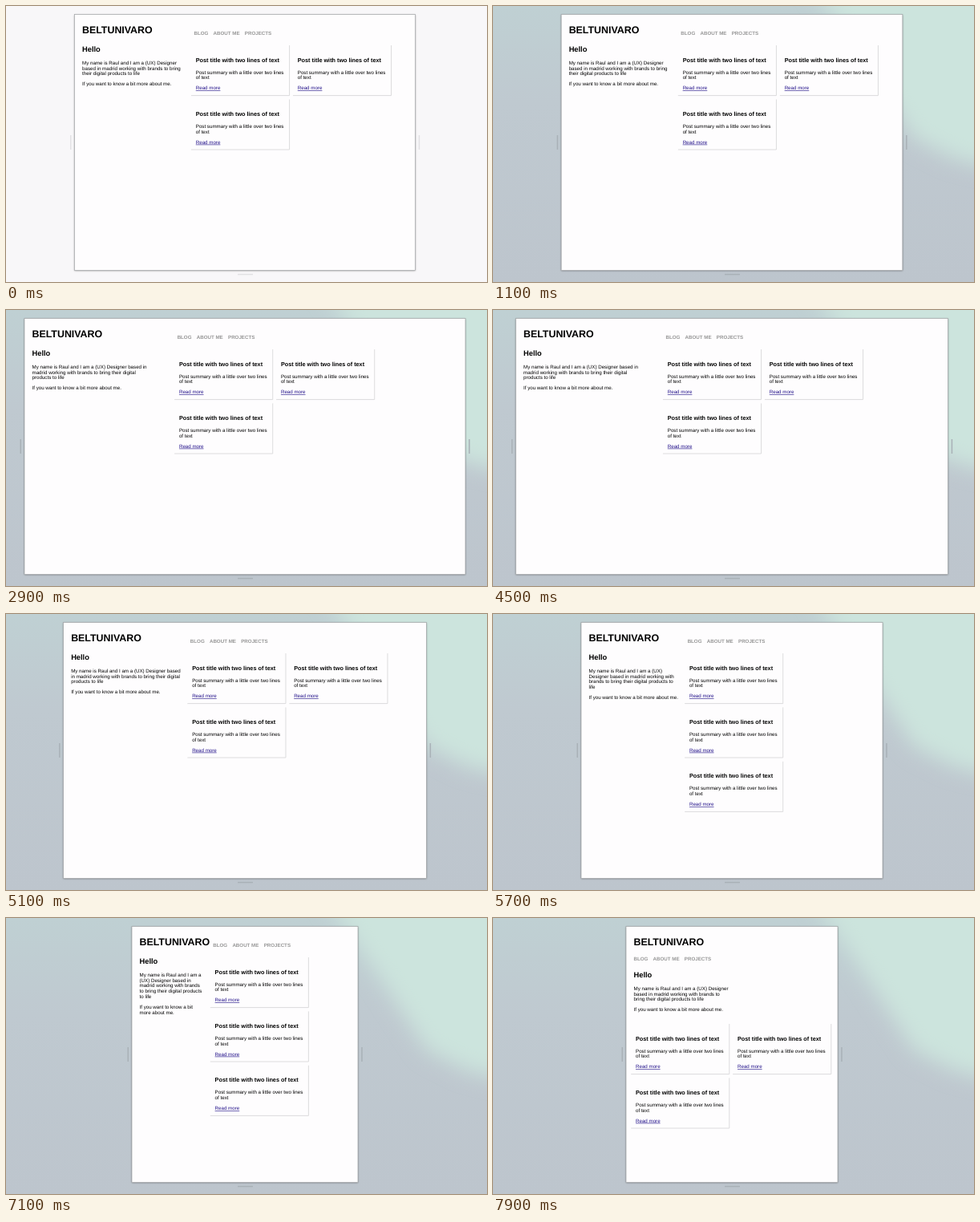
Animation of 600x344 px, one loop 8000 ms. Source, as an HTML page:

```html
<!DOCTYPE html>
<html lang="en">
<head>
<meta charset="utf-8">
<title>Responsive page</title>
<style>
  html, body { margin: 0; width: 100%; height: 100%; overflow: hidden; background: #f8f7f9; }
  svg { display: block; width: 600px; height: 344px; }
  text { font-family: "Liberation Sans", Arial, sans-serif; font-size: 6.2px; text-rendering: geometricPrecision; }
  .brand { font-size: 12.4px; font-weight: bold; }
  .nav { font-weight: bold; fill: #979797; }
  .heading { font-size: 9.3px; font-weight: bold; }
  .title { font-size: 7.27px; font-weight: bold; }
  .link { fill: #23128a; text-decoration: underline; }
  .edge { fill: none; stroke: #d9d8da; stroke-width: .9; }
</style>
</head>
<body>
<svg viewBox="0 0 600 344">
  <defs>
    <linearGradient id="sky" x2="0" y2="1">
      <stop offset="0" stop-color="#bfd0d3"/>
      <stop offset=".35" stop-color="#bfc9d0"/>
      <stop offset="1" stop-color="#bdc5cd"/>
    </linearGradient>
    <filter id="soft" x="-30%" y="-30%" width="160%" height="160%"><feGaussianBlur stdDeviation="13"/></filter>
    <filter id="shade" x="-5%" y="-5%" width="110%" height="110%"><feGaussianBlur stdDeviation="1.3"/></filter>
  </defs>
  <rect width="600" height="344" fill="#f8f7f9"/>
  <g id="backdrop">
    <rect width="600" height="344" fill="url(#sky)"/>
    <path d="M395-30L470 80L525 165L575 190L640 205V-30Z" fill="#cce4dd" filter="url(#soft)"/>
  </g>
  <rect id="shadow" y="11" height="319" fill="#000" opacity=".42" filter="url(#shade)"/>
  <rect id="page" y="10.5" height="319" fill="#fefdfe" stroke="#a3a5a8" stroke-width=".7"/>
  <g id="handles">
    <rect id="leftHandle" y="161" width="1.5" height="18"/>
    <rect id="rightHandle" y="161" width="1.5" height="18"/>
    <rect x="289" y="333.8" width="19" height="1.5"/>
  </g>
  <g id="content"></g>
</svg>
<script>
const LOOP = 8000, STEP = 100, CENTER = 298, LINE = 6.85;
const ACTIVE_AT = 1100;
const STACKED_BELOW = 272, TWO_COLUMNS_FROM = 392;

// Time and left edge of the page while it is dragged wider and narrower.
const drag = [[1000, 85.5], [1900, 67], [2900, 23], [3500, 12], [4200, 12],
              [4500, 28.5], [5700, 110], [7100, 157], [7800, 166]];

const intro = [
  "My name is Raul and I am a (UX) Designer based in madrid working with brands to bring their digital products to life",
  "If you want to know a bit more about me."
];

const byId = id => document.getElementById(id);
const pen = document.createElement("canvas").getContext("2d");

function textWidth(text, size, weight = "normal") {
  pen.font = `${weight} 100px "Liberation Sans", Arial, sans-serif`;
  return pen.measureText(text).width * size / 100;
}

const slope = i => (drag[i + 1][1] - drag[i][1]) / (drag[i + 1][0] - drag[i][0]);

function tangent(i) {
  if (i === 0 || i === drag.length - 1) return 0;
  const a = slope(i - 1), b = slope(i);
  return a * b > 0 ? 2 * a * b / (a + b) : 0;
}

// Monotone cubic through the drag points.
function leftEdge(t) {
  const last = drag.length - 1;
  if (t <= drag[0][0]) return drag[0][1];
  if (t >= drag[last][0]) return drag[last][1];
  const i = drag.findIndex(p => p[0] > t) - 1;
  const [t0, x0] = drag[i], [t1, x1] = drag[i + 1];
  const d = t1 - t0, u = (t - t0) / d, v = 1 - u;
  return v * v * ((1 + 2 * u) * x0 + u * d * tangent(i)) +
         u * u * ((1 + 2 * v) * x1 - v * d * tangent(i + 1));
}

function wrap(text, limit) {
  const lines = [""];
  for (const word of text.split(" ")) {
    const current = lines[lines.length - 1];
    const longer = current ? current + " " + word : word;
    if (current && textWidth(longer, 6.2) > limit) lines.push(word);
    else lines[lines.length - 1] = longer;
  }
  return lines;
}

const label = (x, y, text, kind = "") =>
  `<text class="${kind}" x="${x.toFixed(2)}" y="${y.toFixed(2)}">${text}</text>`;

function menu(x, y) {
  return ["BLOG", "ABOUT ME", "PROJECTS"].map(item => {
    const out = label(x, y, item, "nav");
    x += textWidth(item, 6.2, "bold") + 6.2;
    return out;
  }).join("");
}

function introduction(x, y, limit) {
  let out = label(x, y, "Hello", "heading");
  y += 15.7;
  for (const paragraph of intro) {
    for (const line of wrap(paragraph, limit)) {
      out += label(x, y, line);
      y += LINE;
    }
    y += 6.2;
  }
  return out;
}

function card(x, y) {
  const textX = x + 5.8;
  return `<path class="edge" d="M${x} ${y + 62.6}h122.6v-62.6"/>` +
    label(textX, y + 20.6, "Post title with two lines of text", "title") +
    label(textX, y + 35.6, "Post summary with a little over two lines") +
    label(textX, y + 42.4, "of text") +
    label(textX, y + 55.2, "Read more", "link");
}

function cards(x, y, columns) {
  return [0, 1, 2].map(i =>
    card(x + i % columns * 127, y + Math.floor(i / columns) * 67.4)).join("");
}

function setAttributes(id, values) {
  for (const name in values) byId(id).setAttribute(name, values[name]);
}

function draw(t) {
  const left = leftEdge(t), width = 2 * (CENTER - left);
  const active = t >= ACTIVE_AT;
  const stacked = width < STACKED_BELOW;
  const textX = left + 9.5;
  const mainX = left + width / 3 + 7.3;

  setAttributes("backdrop", { visibility: active ? "visible" : "hidden" });
  setAttributes("handles", { fill: active ? "#a9b1b7" : "#e2e1e4" });
  setAttributes("page", { x: left, width });
  setAttributes("shadow", { x: left, width });
  setAttributes("leftHandle", { x: left - 5.5 });
  setAttributes("rightHandle", { x: left + width + 4.2 });

  byId("content").innerHTML = label(textX, 33.9, "BELTUNIVARO", "brand") + (stacked
    ? menu(textX, 52.6) + introduction(textX, 74, width / 2 - 10) + cards(left + 6.2, 132, 2)
    : menu(mainX, 35.7) + introduction(textX, 57, Math.min(width / 3 - 13, 150)) +
      cards(mainX - 3.5, 49, width >= TWO_COLUMNS_FROM ? 2 : 1));
}

const start = performance.now();
let shown = -1;

function tick() {
  const t = Math.floor((performance.now() - start) % LOOP / STEP) * STEP;
  if (t !== shown) draw(shown = t);
  requestAnimationFrame(tick);
}
tick();
</script>
</body>
</html>
```
